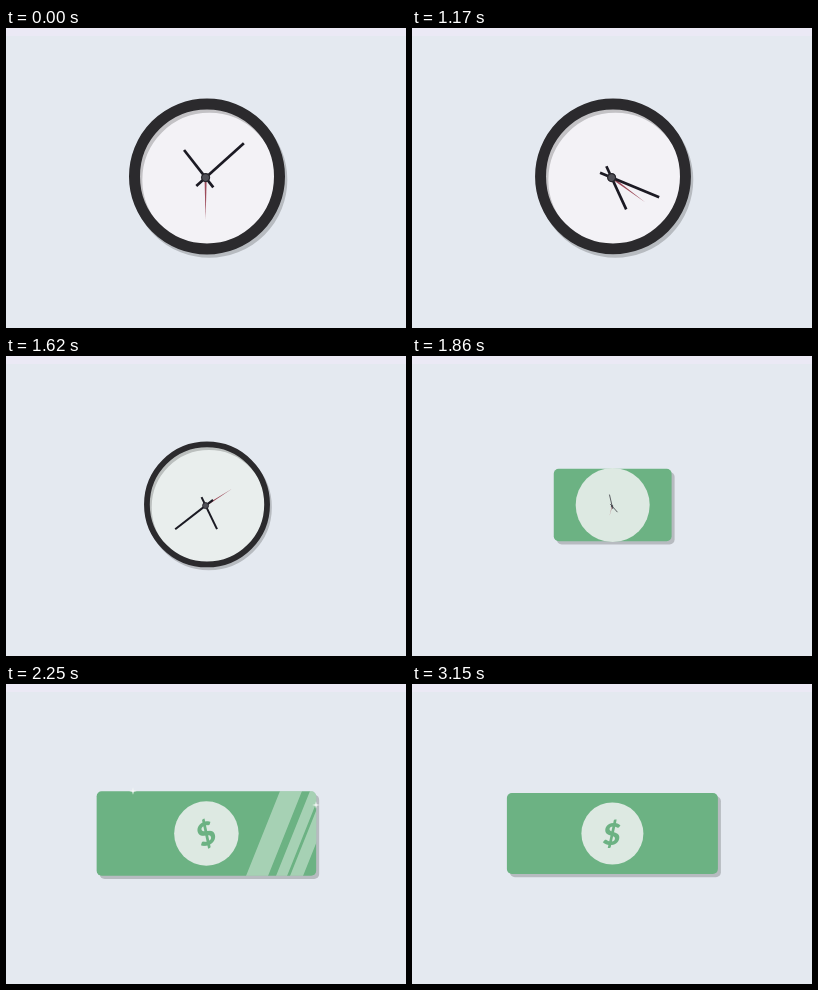
An HTML page for the animation above (4.02 s loop, 400 px wide and 300 px high).

```html
<!DOCTYPE html>
<html lang="en">
<head>
<meta charset="utf-8">
<title>Time is money</title>
<style>
  html, body { margin: 0; width: 100%; height: 100%; overflow: hidden; background: #e4e9f0; }
  svg { display: block; width: 100%; height: 100%; }
  text { font: italic 900 30px Lato, sans-serif; text-anchor: middle; fill: #6cb283; }
</style>
</head>
<body>
<svg viewBox="0 0 400 300">
  <defs>
    <clipPath id="noteClip"><rect id="clipRect" rx="5"/></clipPath>
    <path id="star" d="M0-5 1-1 5 0 1 1 0 5-1 1-5 0-1-1Z" fill="#f4f7f6"/>
  </defs>
  <rect width="400" height="300" fill="#e4e9f0"/>
  <rect width="400" height="8" fill="#ebe9f5"/>

  <rect id="noteShadow" rx="5" opacity=".2" transform="translate(3 3.3)"/>
  <rect id="paper" rx="5" fill="#6cb283"/>

  <circle id="face"/>
  <g id="rings" fill="none">
    <circle id="ringShadow" stroke="#000" opacity=".2"/>
    <circle id="ring" stroke="#2b2a2d"/>
  </g>

  <g id="hands">
    <path id="second" d="M-1.1 0 0-42 1.1 0Z" fill="#9c4a59"/>
    <g stroke="#1b1a23" stroke-width="2.7">
      <path id="hour" d="M0 12.5V-35"/>
      <path id="minute" d="M0 12.5V-51.5"/>
    </g>
    <circle r="4" fill="#505057" stroke="#27262c" stroke-width="1.2"/>
  </g>

  <g id="dollar"><text y="10.8">$</text></g>

  <g clip-path="url(#noteClip)">
    <g id="shine" fill="#fff" opacity=".4">
      <path d="M-29 45H-7L29-45H7Z"/>
      <path d="M1 45H12L48-45H37Z"/>
      <path d="M15 45H28L64-45H51Z"/>
    </g>
  </g>
  <use id="starA" href="#star"/>
  <use id="starB" href="#star"/>
</svg>
<script>
const LOOP = 4020, STEP = 30;
const el = id => document.getElementById(id);
const set = (id, attrs) => {
  for (const name in attrs) el(id).setAttribute(name, attrs[name]);
};
const show = (id, visible) => { el(id).style.display = visible ? "" : "none"; };

const mix = (a, b, u) => a + (b - a) * u;
const progress = (t, from, to) => Math.min(1, Math.max(0, (t - from) / (to - from)));
const easeOut = (u, power) => 1 - (1 - u) ** power;

// Accelerating turn in degrees: starts at rest and winds up exponentially.
function spin(t, rate, growth) {
  const x = Math.max(0, t - 120) / 1000;
  return rate * x * (Math.exp(growth * x) - 1);
}

function draw(t) {
  const shrink = progress(t, 1110, 1860);
  const grow = progress(t, 1703, 2203);
  const swell = 1 + .055 * (1 - progress(t, 2100, 3150)) ** 2;
  const spread = easeOut(grow, 2);
  const cx = mix(201, 200.4, spread), cy = mix(148.4, 149.5, spread);

  const width = 211 * swell * spread, height = 81 * swell * easeOut(grow, 5);
  const box = { x: cx - width / 2, y: cy - height / 2, width, height };
  for (const id of ["noteShadow", "paper", "clipRect"]) set(id, box);

  // The clock face becomes the medallion of the note.
  const outer = mix(78, 37, shrink ** 2.6);
  const inner = shrink < 1
    ? mix(67, 37, shrink ** 2.9)
    : 31 * swell + 4.3 * (1 - progress(t, 1860, 2060)) ** 3;
  const band = shrink < 1 ? outer - inner : 0;
  const disc = { cx, cy, r: inner + band / 2 };
  const [r, g, b] = [[243, 221], [242, 233], [246, 226]].map(([from, to]) => mix(from, to, shrink ** 2));
  set("face", { ...disc, fill: `rgb(${r},${g},${b})` });
  for (const id of ["ring", "ringShadow"]) set(id, { ...disc, "stroke-width": band });
  set("ringShadow", { transform: `translate(${outer * .03} ${outer * .044})` });
  show("rings", band > 0);

  const handScale = Math.max(0, 1 - .77 * (Math.max(0, t - 1110) / 750) ** 2.9);
  set("hands", { transform: `translate(${199.6 + spread} ${149.6 + spread}) scale(${handScale})` });
  show("hands", handScale > 0);
  const turn = spin(t, 24.3, 1.2);
  set("minute", { transform: `rotate(${48 + turn})` });
  set("hour", { transform: `rotate(${-38 + 3 * turn})` });
  set("second", { transform: `rotate(${180 + spin(t, 482, .8)})` });

  const tilt = -260 * (1 - progress(t, 1890, 2550)) ** 3;
  const size = swell * easeOut(progress(t, 1890, 2100), 3);
  set("dollar", { transform: `translate(199.8 149.8) rotate(${tilt}) scale(${size})` });
  set("shine", { transform: `translate(${268 + (t - 2250) * .6} 149.5)` });

  const twinkle = .8 * Math.sin(Math.PI * progress(t, 2130, 2430));
  set("starA", { transform: `translate(127 107) scale(${twinkle})` });
  set("starB", { transform: `translate(310 121) scale(${twinkle})` });
}

const start = performance.now();
function tick() {
  const t = (performance.now() - start) % LOOP;
  draw(Math.floor(t / STEP) * STEP);
  requestAnimationFrame(tick);
}
tick();
</script>
</body>
</html>
```
